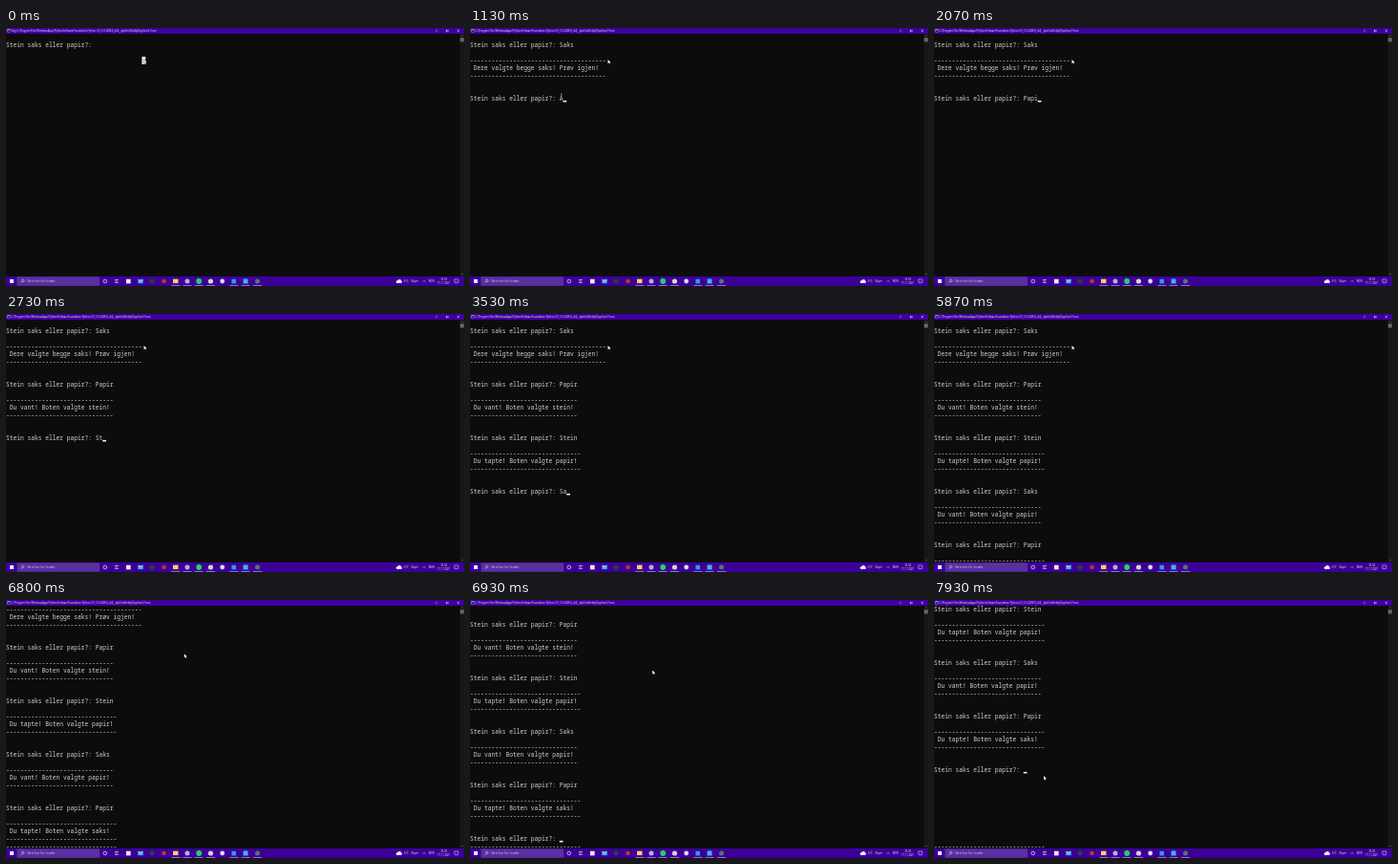
Write an HTML page with a canvas that moves like this. It is 480 by 270 pixels and loops after 8 s.

```html
<!DOCTYPE html>
<html lang="nb">
<head>
<meta charset="utf-8">
<style>
  html, body { margin: 0; width: 100%; height: 100%; overflow: hidden; background: #0c0c0c; }
  canvas { display: block; }
</style>
</head>
<body>
<canvas id="stage" width="480" height="270"></canvas>
<script>
const ctx = document.getElementById('stage').getContext('2d');
const LOOP = 8000, CELL = 3.75, ROW = 8, TOP = 6;
const MONO = '"Noto Sans Mono", monospace', SANS = '"Open Sans", sans-serif';
const PROMPT = 'Stein saks eller papir?: ';
const PATH = 'C:\\Program Files\\WindowsApps\\PythonSoftwareFoundation.Python.3.9_3.9.2288.0_x64__qbz5n2kfra8p0\\python3.9.exe';

// Rule width and message printed after each answer
const RESULTS = [
  [38, 'Dere valgte begge saks! Prøv igjen!'],
  [30, 'Du vant! Boten valgte stein!'],
  [31, 'Du tapte! Boten valgte papir!'],
  [30, 'Du vant! Boten valgte papir!'],
  [31, 'Du tapte! Boten valgte saks!']
];

// Keystrokes: \b erases, \n submits
const KEYS = [
  [200, 'S'], [330, 'a'], [470, 'k'], [530, 's'], [670, '\n'],
  [1130, 'Å'], [1400, '\b'],
  [1730, 'P'], [1870, 'a'], [1930, 'p'], [2070, 'i'], [2130, 'r'], [2330, '\n'],
  [2600, 'S'], [2730, 't'], [2800, 'e'], [2870, 'i'], [2930, 'n'], [3130, '\n'],
  [3470, 'S'], [3530, 'a'], [3670, 'k'], [3730, 's'], [3870, '\n'],
  [4530, 'S'], [4870, '\b'],
  [5200, 'P'], [5330, 'a'], [5470, 'p'], [5670, 'i'], [5730, 'r'], [5870, '\n']
];
const WHEEL = [6730, 6930, 7070, 7270, 7400];
const MOUSE = [[6660, 144.5, 33], [6800, 186.8, 56], [7130, 198, 100], [7500, 202, 160], [7900, 115, 184]];

function rect(x, y, w, h, color) {
  ctx.fillStyle = color;
  ctx.fillRect(x, y, w, h);
}

function disc(x, y, r, color) {
  ctx.fillStyle = color;
  ctx.beginPath();
  ctx.arc(x, y, r, 0, 7);
  ctx.fill();
}

function line(color, width, ...points) {
  ctx.strokeStyle = color;
  ctx.lineWidth = width;
  ctx.beginPath();
  points.forEach(([x, y]) => ctx.lineTo(x, y));
  ctx.stroke();
}

// Large font scaled down keeps fractional advances
function text(string, x, y, size, font, color, align = 'left') {
  ctx.save();
  ctx.translate(x, y);
  ctx.scale(.05, .05);
  ctx.font = `${size * 20}px ${font}`;
  ctx.textAlign = align;
  ctx.fillStyle = color;
  ctx.fillText(string, 0, 0);
  ctx.restore();
}

const printAt = (string, y) => text(string, 0, y + 6, 6.25, MONO, '#d2d2d2');

function answersAt(t) {
  const answers = [''];
  for (const [time, key] of KEYS) {
    if (time > t) break;
    const last = answers.length - 1;
    if (key === '\n') answers.push('');
    else if (key === '\b') answers[last] = answers[last].slice(0, -1);
    else answers[last] += key;
  }
  return answers;
}

function mouseAt(t) {
  const next = MOUSE.findIndex(p => p[0] > t);
  if (next === 0) return MOUSE[0].slice(1);
  if (next < 0) return MOUSE[MOUSE.length - 1].slice(1);
  const [t0, x0, y0] = MOUSE[next - 1], [t1, x1, y1] = MOUSE[next];
  const k = (t - t0) / (t1 - t0);
  return [x0 + (x1 - x0) * k, y0 + (y1 - y0) * k];
}

function drawConsole(t) {
  const scroll = 3 * WHEEL.filter(time => time <= t).length;
  const rowY = row => TOP + (row - scroll) * ROW;
  const answers = answersAt(t);
  answers.forEach((answer, i) => {
    const row = 1 + i * 7;
    printAt(PROMPT + answer, rowY(row));
    if (i < answers.length - 1) {
      const [width, message] = RESULTS[i];
      printAt('-'.repeat(width), rowY(row + 2));
      printAt(' ' + message, rowY(row + 3));
      printAt('-'.repeat(width), rowY(row + 4));
    } else if (t >= 70 && !(t >= 4730 && t < 4870)) {
      rect((PROMPT.length + answer.length) * CELL, rowY(row) + 5.9, CELL, 1.6, '#f2f2f2');
    }
  });
  // The lowest row is not repainted when scrolling
  if (scroll) printAt('-'.repeat(31), 254);
  if (t < 70) rect(38 * CELL, TOP + 3 * ROW, CELL, ROW, '#f2f2f2');
}

function drawWindow(t) {
  rect(0, 0, 480, 6, '#3f00a0');
  rect(1.3, 1.3, 3, 3, '#c9ccd6');
  rect(1.6, 2.2, 2.4, 1.8, '#20242c');
  text((t < 70 ? 'Velg ' : '') + PATH, 5.6, 4, 2.65, SANS, '#eee8fa');
  line('#ddd', .5, [450, 3], [452.4, 3]);
  ctx.strokeRect(461.5, 2.2, 1.7, 1.7);
  line('#ddd', .5, [472.8, 1.8], [475.2, 4.2]);
  line('#ddd', .5, [475.2, 1.8], [472.8, 4.2]);

  rect(475.7, 6, 4.3, 254, '#171717');
  rect(475.9, 10.2, 4, 4.2, '#666');
  line('#999', .5, [477, 8.6], [478, 7.6], [479, 8.6]);
  line('#999', .5, [477, 257.2], [478, 258.2], [479, 257.2]);
}

function drawTaskbar() {
  const white = '#f0ecfa';
  rect(0, 260, 480, 10, '#3c0098');
  rect(4, 263, 4, 4, white);
  rect(11.5, 260.3, 86.5, 9.5, '#59309f');
  ctx.strokeStyle = white;
  ctx.lineWidth = .5;
  ctx.beginPath();
  ctx.arc(17.7, 264.5, 1.2, 0, 7);
  ctx.stroke();
  line(white, .5, [16.8, 265.4], [15.6, 266.7]);
  text('Skriv her for å søke', 22, 266.2, 3.3, SANS, '#d8cdea');

  ctx.lineWidth = .7;
  ctx.strokeStyle = white;
  ctx.beginPath();
  ctx.arc(103.8, 265, 1.8, 0, 7);
  ctx.stroke();
  line(white, .6, [114, 263.5], [118, 263.5]);
  line(white, .6, [114, 265], [117, 265]);
  line(white, .6, [114, 266.5], [118, 266.5]);

  rect(126, 262.8, 4.6, 4.6, '#eeeeee');
  rect(138.3, 263, 5.4, 4.2, '#4ba8ed');
  line('#d9f0ff', .6, [138.5, 263.2], [141, 265.4], [143.5, 263.2]);
  disc(153, 265, 2.5, '#23452f');
  disc(165.5, 265, 2.3, '#b63b2c');
  rect(175, 262.7, 5.5, 4.4, '#f5cf65');
  disc(190, 265, 2.5, '#a6b4ee');
  disc(202.2, 265, 2.9, '#1ed760');
  disc(214.5, 265, 2.6, '#d9d4c5');
  disc(226.7, 265, 2.4, '#d5dcec');
  rect(236.5, 262.8, 4.6, 4.6, '#2b9be6');
  rect(248.6, 262.5, 5, 5, '#3fb2e8');
  disc(263.5, 265, 2.5, '#55766d');
  for (const x of [178, 190, 202, 214.5, 239, 251, 263.5]) rect(x - 4.5, 269.2, 9, .8, '#a98be0');

  disc(410.5, 265.6, 1.6, white);
  disc(412.4, 265, 1.9, white);
  disc(413.8, 265.8, 1.3, white);
  text('6°C', 417, 266.2, 3, SANS, white);
  text('Skyet', 424.6, 266.2, 3, SANS, white);
  line(white, .5, [436.8, 265.7], [438.2, 264.3], [439.6, 265.7]);
  text('NOR', 442.7, 266.2, 2.9, SANS, white);
  text('16.36', 458.7, 263.8, 2.8, SANS, white, 'center');
  text('17.11.2021', 458.7, 268.4, 2.6, SANS, white, 'center');
  line(white, .5, [470, 263], [474, 263], [474, 266.3], [472.8, 266.3], [472, 267.3], [471.5, 266.3], [470, 266.3], [470, 263]);
}

function drawMouse(t) {
  const [x, y] = mouseAt(t);
  ctx.beginPath();
  for (const [dx, dy] of [[0, 0], [0, 4.2], [1, 3.3], [1.7, 4.8], [2.3, 4.5], [1.7, 3.1], [3, 3.1]]) {
    ctx.lineTo(x + dx, y + dy);
  }
  ctx.closePath();
  ctx.strokeStyle = '#000';
  ctx.lineWidth = .6;
  ctx.stroke();
  ctx.fillStyle = '#fff';
  ctx.fill();
}

function draw() {
  const t = performance.now() % LOOP;
  rect(0, 0, 480, 270, '#0c0c0c');
  drawConsole(t);
  drawWindow(t);
  drawTaskbar();
  drawMouse(t);
  requestAnimationFrame(draw);
}
draw();
</script>
</body>
</html>
```
